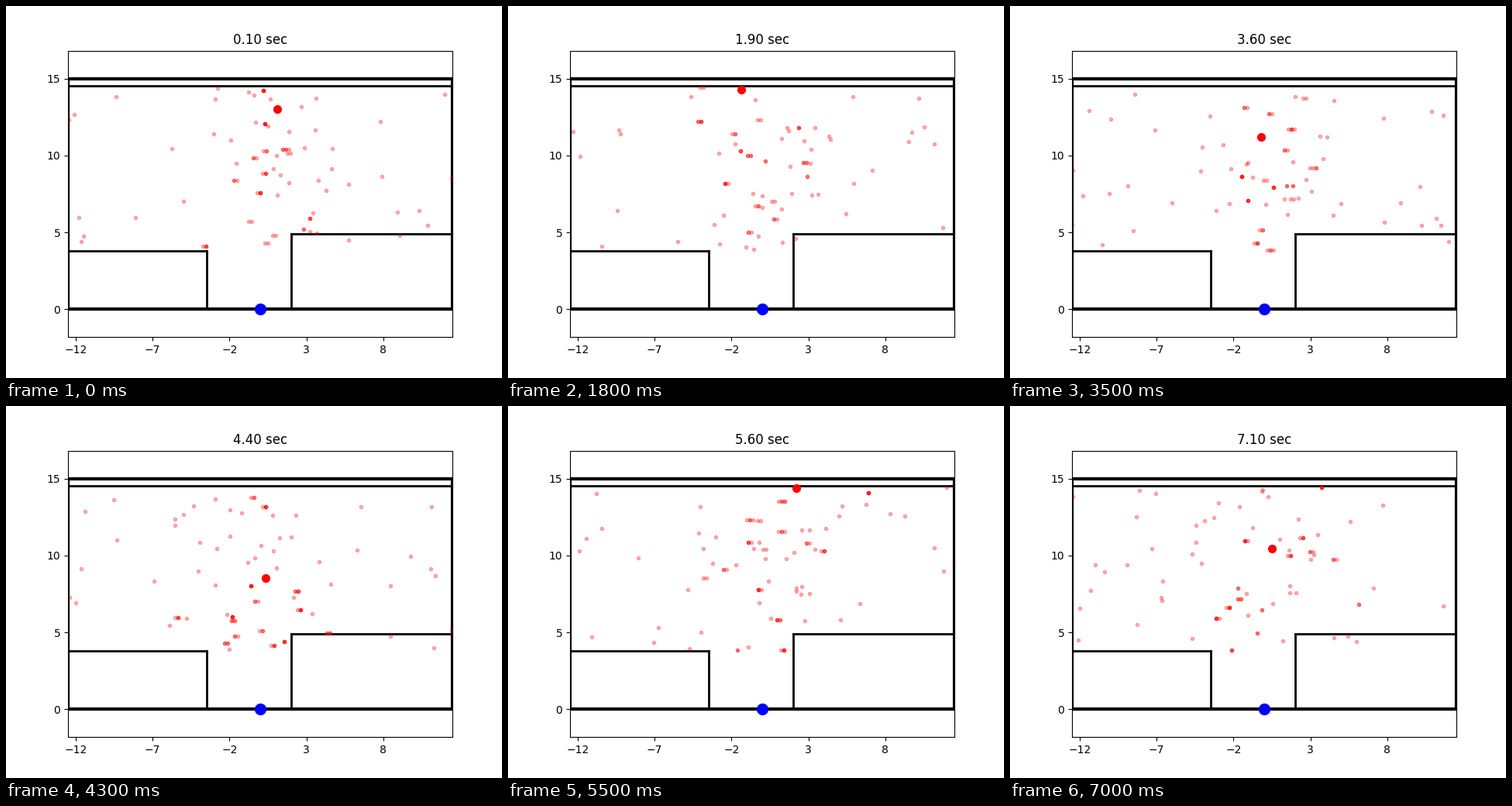
Recreate the animation shown at these times as a matplotlib script. Size 640x480 px, loop 7100 ms.

```python
import numpy as np
import matplotlib.pyplot as plt
from matplotlib.animation import FuncAnimation

FRAMES = 71
STEP_MS = 100
HALF_WIDTH = 12.5
PX_PER_UNIT = 19.84
LOW, HIGH = 3.85, 14.45   # height range of the particles

LOOSE = 46                # light particles per frame
CLUSTERS = 15             # groups of overlapping particles
LIFETIME = 8              # frames a group survives

# Waypoints of the estimate.
PATH_T = [0, 7, 18, 27, 43, 55, 70]
PATH_X = [1.1, 0.65, -1.35, -0.8, 0.35, 2.23, 0.52]
PATH_Y = [13.0, 9.7, 14.28, 13.88, 8.52, 14.38, 10.45]


def estimate_at(frame):
    return np.interp(frame, PATH_T, PATH_X), np.interp(frame, PATH_T, PATH_Y)


def loose_particles(frame):
    """Fresh random particles: part uniform, part gathered in the middle."""
    rng = np.random.default_rng(frame)
    wide = int(0.7 * LOOSE)
    x = np.concatenate([
        rng.uniform(-HALF_WIDTH, HALF_WIDTH, wide),
        rng.normal(0, 2.4, LOOSE - wide),
    ])
    return np.column_stack([x, rng.uniform(LOW, HIGH, LOOSE)])


def cluster(slot, frame):
    """Overlapping copies that drift for a while, then start elsewhere."""
    generation, age = divmod(frame + 3 * slot, LIFETIME)
    rng = np.random.default_rng([slot, generation])
    x = rng.normal(0, 2.3) + age * rng.normal(0, 0.08)
    y = rng.uniform(LOW, HIGH) + age * rng.normal(0, 0.15)
    copies = rng.integers(2, 6)
    offsets = 0.2 * rng.choice([0, 0, 0, 0, 1, -1], copies)
    return np.column_stack([x + offsets,
                            np.full(copies, np.clip(y, LOW, HIGH))])


fig, ax = plt.subplots(figsize=(6.4, 4.8), dpi=100)
half_height = 369.6 / PX_PER_UNIT / 2
ax.set_xlim(-HALF_WIDTH, HALF_WIDTH)
ax.set_ylim(7.5 - half_height, 7.5 + half_height)
ax.set_xticks(np.arange(-12, 12, 5))
ax.set_yticks(np.arange(0, 16, 5))


def wall(xs, ys, width):
    ax.plot(xs, ys, color="black", lw=width)


L, R = -HALF_WIDTH, HALF_WIDTH
for y in (0, 15):
    wall([L, R], [y, y], 3)
for x in (L, R):
    wall([x, x], [0, 15], 3)
wall([L, R], [14.52, 14.52], 2)
for side, edge, top in ((L, -3.5, 3.8), (R, 2, 4.9)):
    wall([side, edge], [top, top], 2)
    wall([edge, edge], [0, top], 2)

particles, = ax.plot([], [], "o", color="red", ms=3, alpha=0.3)
estimate, = ax.plot([], [], "o", color="red", ms=7)
ax.plot([0], [0], "o", color="blue", ms=10)
title = ax.set_title("")


def update(frame):
    groups = [cluster(slot, frame) for slot in range(CLUSTERS)]
    cloud = np.vstack([loose_particles(frame), *groups])
    particles.set_data(cloud[:, 0], cloud[:, 1])
    x, y = estimate_at(frame)
    estimate.set_data([x], [y])
    title.set_text(f"{(frame + 1) / 10:.2f} sec")
    return particles, estimate, title


anim = FuncAnimation(fig, update, frames=FRAMES, interval=STEP_MS,
                     repeat=True, repeat_delay=0)
plt.show()
```
